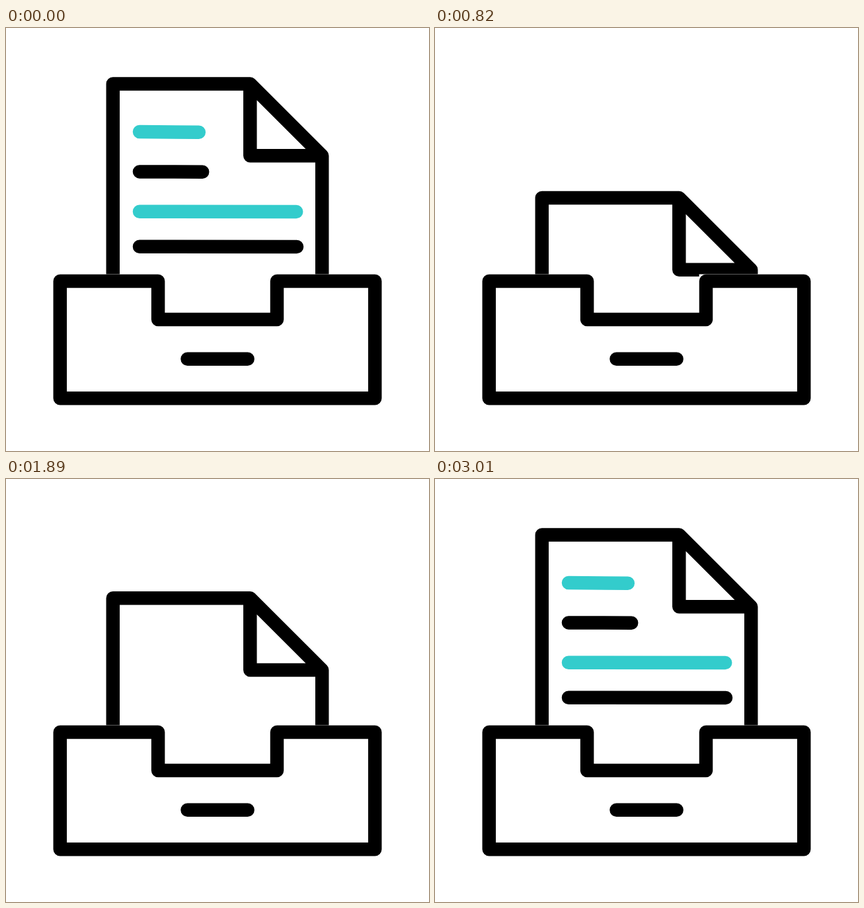
These frames come from a looping animation (640 px wide and 640 px high, 3.22 s). An HTML page:

```html
<!DOCTYPE html>
<html lang="en">
<head>
<meta charset="utf-8">
<title>Document tray</title>
<style>
  html, body { margin: 0; width: 100%; height: 100%; overflow: hidden; background: #fff; }
  svg { display: block; width: 100vw; height: 100vh; }
  path { fill: none; stroke: #000; stroke-width: 20.5; stroke-linecap: round; stroke-linejoin: round; }
</style>
</head>
<body>
<svg viewBox="0 0 640 640">
  <defs>
    <clipPath id="above">
      <path d="M0 0H640V372.6H399.6V431.5H240.6V372.6H0Z"/>
    </clipPath>
  </defs>
  <g clip-path="url(#above)">
    <g id="paper">
      <path d="M161.8 900V84.5H369.3L478.2 193.3V900M369.3 84.5V193.3H478.2"/>
      <g id="lines"></g>
    </g>
  </g>
  <path d="M81.8 383H230.1V441.1H410V383H558.2V560.2H81.8Z"/>
  <path d="M274.5 500.7H365.6"/>
</svg>
<script>
const LOOP = 3220, LEFT = 202, TRAVEL = 450;
const OUT_START = 90, IN_START = 1580;

// y at both ends, right end, then [start, length] in steps for erasing and writing
const lines = [
  { y1: 157.1, y2: 157.7, right: 291.8, color: '#33cccc', erase: [0.5, 10], write: [11.4, 12] },
  { y1: 217.4, y2: 217.7, right: 297.2, color: '#000', erase: [4.8, 20], write: [12.6, 18.5] },
  { y1: 277.7, y2: 278, right: 439.2, color: '#33cccc', erase: [5.5, 20], write: [14.8, 19.2] },
  { y1: 330.7, y2: 331, right: 440, color: '#000', erase: [4.8, 20], write: [13.1, 12.5] }
];

const paper = document.getElementById('paper');
const group = document.getElementById('lines');
for (const line of lines) {
  line.el = document.createElementNS('http://www.w3.org/2000/svg', 'path');
  line.el.style.stroke = line.color;
  group.appendChild(line.el);
}

function ease(x) {
  x = Math.min(1, Math.max(0, x));
  return x * x * (3 - 2 * x);
}

const progress = (step, [start, length]) => ease((step - start) / length);

// Three steps every 130 ms; a and b are the offsets of the second and third.
function stepAt(ms, a, b) {
  if (ms < 0) return 0;
  const rest = ms % 130;
  return 3 * Math.floor(ms / 130) + (rest < a ? 1 : rest < b ? 2 : 3);
}

function drawLine(line, amount) {
  const x = LEFT + (line.right - LEFT) * amount;
  const y = line.y1 + (line.y2 - line.y1) * amount;
  line.el.setAttribute('d', `M${LEFT} ${line.y1}L${x.toFixed(2)} ${y.toFixed(2)}`);
  line.el.style.display = amount > 0 ? '' : 'none';
}

function render(time) {
  const t = time % LOOP;
  const rising = t >= IN_START;
  const step = rising
    ? Math.min(34, stepAt(t - IN_START, 50, 90))
    : Math.min(22, stepAt(t - OUT_START, 40, 80));
  const drop = TRAVEL * (rising ? ease((13.5 - step) / 18.5) : ease((step - 12.815) / 12.3));

  paper.setAttribute('transform', `translate(0 ${drop.toFixed(2)})`);
  paper.style.display = drop > 357 ? 'none' : '';
  for (const line of lines) {
    drawLine(line, rising ? progress(step, line.write) : 1 - progress(step, line.erase));
  }
}

const begin = performance.now();
function tick() {
  render(performance.now() - begin);
  requestAnimationFrame(tick);
}
tick();
</script>
</body>
</html>
```
